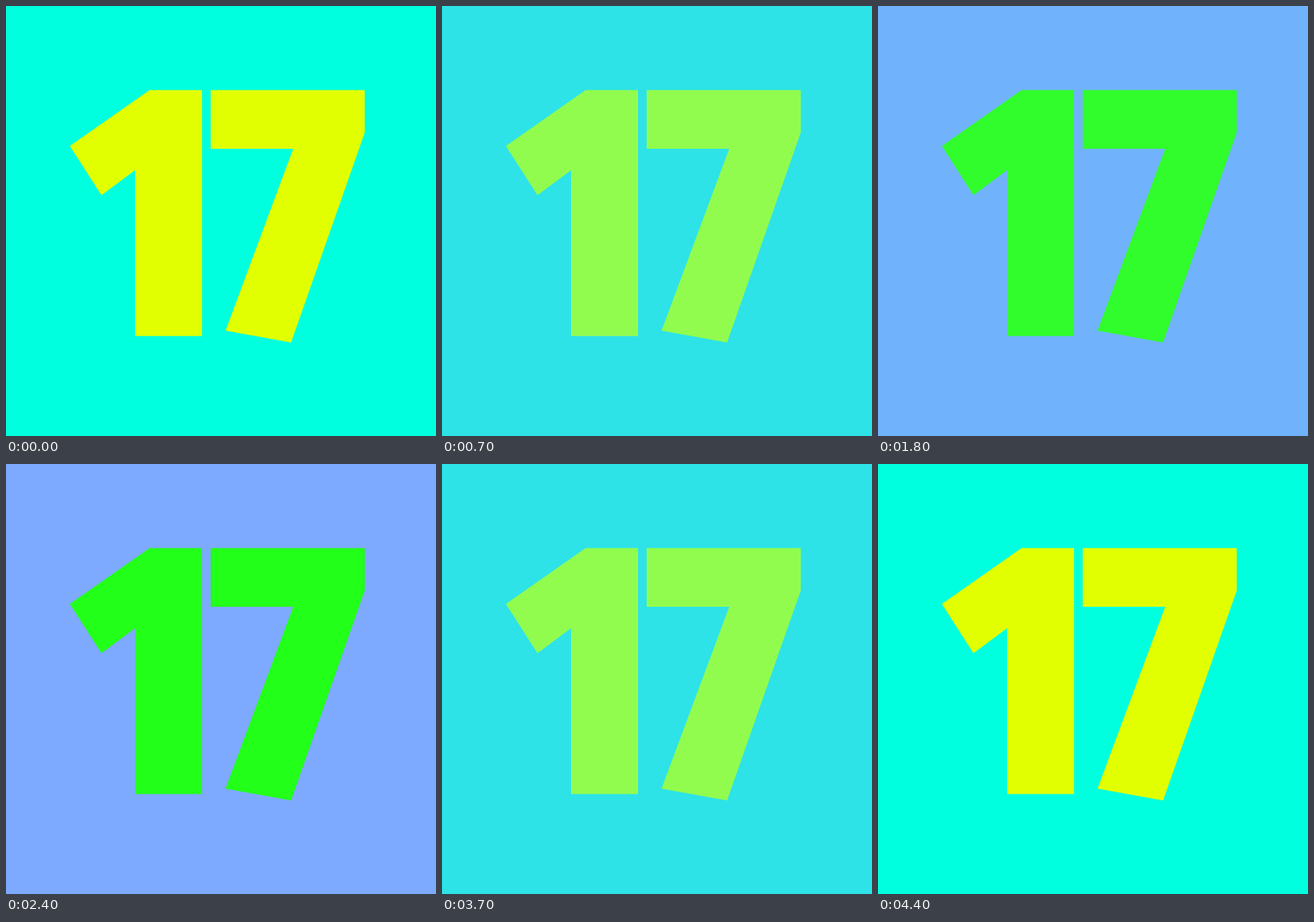
Write an HTML page that moves like this. It is 500 px wide and 500 px high and loops after 4.5 s.

```html
<!DOCTYPE html>
<html lang="en">
<head>
<meta charset="utf-8">
<title>17</title>
<style>
  html, body {
    margin: 0;
    width: 100%;
    height: 100%;
    overflow: hidden;
  }

  svg {
    display: block;
    width: 100%;
    height: 100%;
    background: #00ffdf;
    animation: sky 4.5s infinite;
  }

  .digits {
    fill: #e1ff00;
    animation: ink 4.5s infinite;
  }

  /* Colours advance once every 100 ms; percentages are rounded down. */
  @keyframes sky {
    0%      { background: #00ffdf; animation-timing-function: steps(7); }
    15.555% { background: #2de3e8; animation-timing-function: steps(6); }
    28.888% { background: #50caf3; animation-timing-function: steps(7); }
    44.444% { background: #7daaff; animation-timing-function: steps(1); }
    46.666% { background: #83a6ff; animation-timing-function: steps(1); }
    53.333% { background: #7daaff; animation-timing-function: steps(7); }
    68.888% { background: #50caf3; animation-timing-function: steps(6); }
    82.222% { background: #2de3e8; animation-timing-function: steps(7); }
    97.777%, 100% { background: #00ffdf; }
  }

  @keyframes ink {
    0%      { fill: #e1ff00; animation-timing-function: steps(7); }
    15.555% { fill: #92fc4e; animation-timing-function: steps(6); }
    28.888% { fill: #54f85b; animation-timing-function: steps(7); }
    44.444% { fill: #22ff18; animation-timing-function: steps(1); }
    46.666% { fill: #1aff10; animation-timing-function: steps(1); }
    53.333% { fill: #22ff18; animation-timing-function: steps(7); }
    68.888% { fill: #54f85b; animation-timing-function: steps(6); }
    82.222% { fill: #92fc4e; animation-timing-function: steps(7); }
    97.777%, 100% { fill: #e1ff00; }
  }
</style>
</head>
<body>
<svg viewBox="0 0 500 500" role="img" aria-label="17">
  <g class="digits">
    <path d="M167 97.7H228V383.8H150V191L111 220L74.3 162.7Z"/>
    <path d="M238 97.7H417.2V147L331.5 391.3L255.3 377.5L334 166H238Z"/>
  </g>
</svg>
</body>
</html>
```
